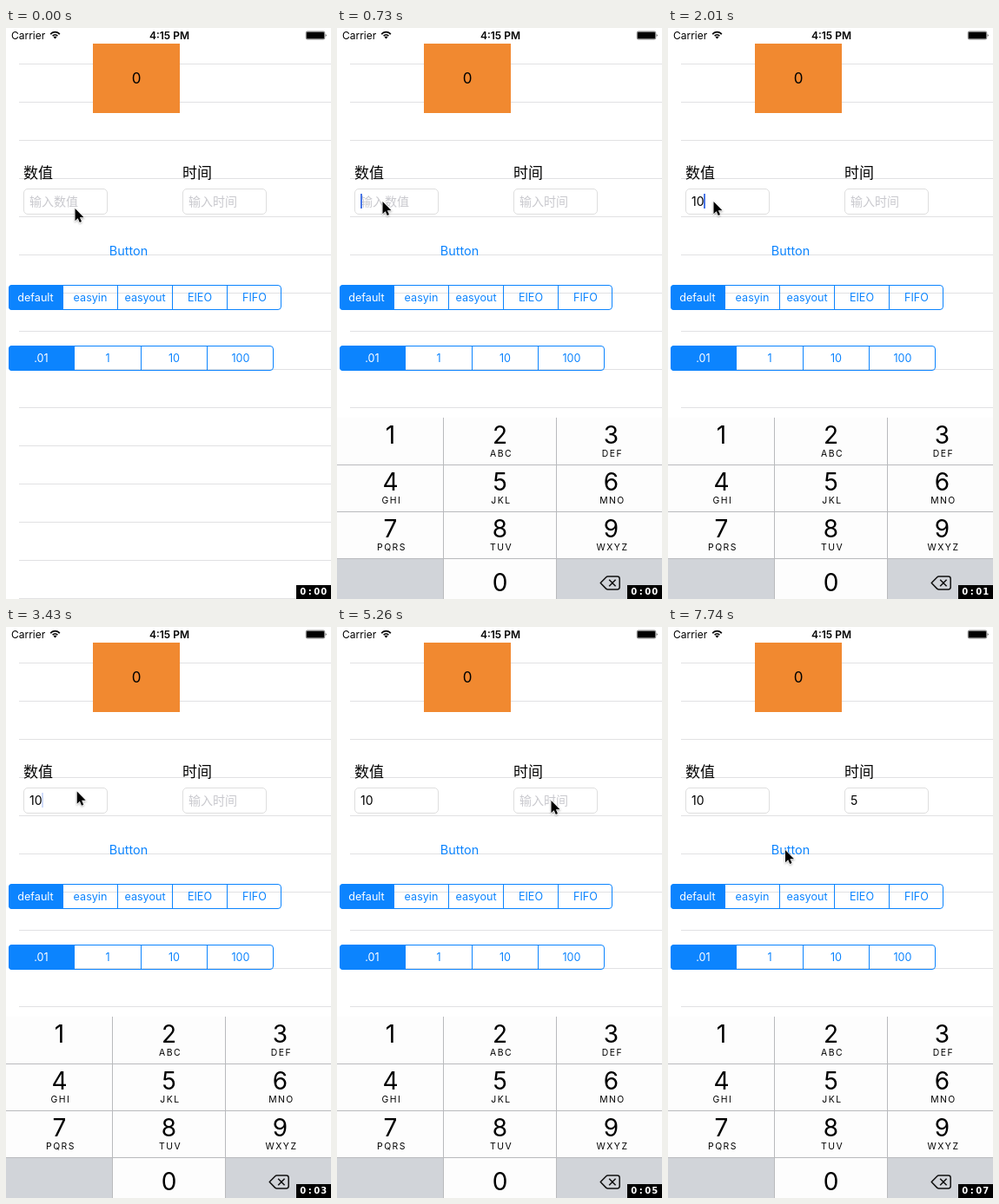
Animation of 374 by 658 pixels, one loop 8 s. Source, as an HTML page:

```html
<!DOCTYPE html>
<html lang="zh-CN">
<head>
<meta charset="utf-8">
<title>Keyboard demo</title>
<style>
  html, body { margin: 0; width: 100%; height: 100%; overflow: hidden; background: #fff; }
  svg { display: block; width: 374px; height: 658px; }
  text { font: 14px Inter, "Noto Sans CJK SC", "Noto Sans CJK", sans-serif; }
  .mid { text-anchor: middle; }
  .label { font-size: 17px; }
  .hint { fill: #c9c9ce; }
  .status { font-size: 12px; }
  .button { font-size: 14.4px; }
  .seg { font-size: 12.6px; }
  .digit { font-size: 28px; }
  .sub { font-size: 10.4px; letter-spacing: 1.5px; }
  .clock { font: bold 10px "DejaVu Sans", sans-serif; }
</style>
</head>
<body>
<svg id="stage" viewBox="0 0 374 658"></svg>
<script>
const LOOP = 8000, FRAME = 1000 / 7, LEAD = 30;
const BLUE = '#0c84fe';
const stage = document.getElementById('stage');

function add(tag, attrs, parent = stage) {
  const el = document.createElementNS('http://www.w3.org/2000/svg', tag);
  for (const key in attrs) el.setAttribute(key, attrs[key]);
  parent.append(el);
  return el;
}
const rect = (x, y, width, height, fill, parent, more) =>
  add('rect', { x, y, width, height, fill, ...more }, parent);
const path = (d, attrs, parent) => add('path', { d, ...attrs }, parent);
function text(str, x, y, cls = '', parent = stage, fill = '') {
  const el = add('text', { x, y, class: cls, ...(fill && { fill }) }, parent);
  el.textContent = str;
  return el;
}

function statusBar() {
  text('Carrier', 6, 12.6, 'status');
  text('4:15 PM', 188, 12.6, 'status mid').style.fontWeight = 600;
  for (const r of [3.4, 6.4]) {
    const dx = r * 0.82, y = 11.3 - r * 0.62;
    path(`M${56.5 - dx} ${y}A${r} ${r} 0 0 1 ${56.5 + dx} ${y}`,
      { fill: 'none', stroke: '#000', 'stroke-width': 1.7 });
  }
  path('M56.5 12.6l-1.9-2.1a2.7 2.7 0 0 1 3.8 0z');
  rect(345.3, 4.1, 21.4, 8.8, 'none', stage, { rx: 1.5, stroke: '#000', 'stroke-width': 0.6 });
  rect(346, 4.8, 20, 7.4, '#000', stage, { rx: 0.8 });
  path('M367.8 6.8q1.6 1.7 0 3.4z');
}

function segments(y, width, names) {
  const left = 3;
  const edge = i => Math.floor(left + i * (width + 1) / names.length);
  path(`M${edge(1)} ${y}H${left + 4}a4 4 0 0 0-4 4v21a4 4 0 0 0 4 4H${edge(1)}z`, { fill: BLUE });
  rect(left + .5, y + .5, width - 1, 28, 'none', stage, { rx: 3.5, stroke: BLUE });
  names.forEach((name, i) => {
    if (i) rect(edge(i) - 1, y, 1, 29, BLUE);
    text(name, (edge(i) + edge(i + 1) - 1) / 2, y + 19, 'seg mid', stage, i ? BLUE : '#fff');
  });
}

function field(x, label) {
  text(label, x, 173, 'label');
  rect(x + .5, 185.5, 96, 29, '#fff', stage, { rx: 4.5, stroke: '#dedede' });
  const hint = text('输入' + label, x + 7, 205, 'hint');
  const value = text('', x + 7, 205);
  return str => {
    value.textContent = str;
    hint.style.opacity = str ? 0 : 1;
  };
}

function keyboard() {
  const pad = add('g');
  const subs = ['', 'ABC', 'DEF', 'GHI', 'JKL', 'MNO', 'PQRS', 'TUV', 'WXYZ'];
  const column = i => 187.5 + (i - 1) * 126 + (i ? 2 : 0) * (i - 1);
  rect(0, 449, 374, 209, '#fdfdfd', pad);
  for (const x of [0, 253]) rect(x, 611, 122, 47, '#d1d4d9', pad);
  for (let y = 503; y < 658; y += 54) rect(0, y, 374, 1, '#b9babd', pad);
  for (const x of [122, 252]) rect(x, 449, 1, 209, '#b9babd', pad);
  subs.forEach((sub, i) => {
    const x = column(i % 3), y = 479 + 54 * Math.floor(i / 3);
    text(i + 1, x, y, 'digit mid', pad);
    text(sub, x + 1.5, y + 15, 'sub mid', pad);
  });
  text('0', column(1), 649, 'digit mid', pad);
  path('M303.2 639.5l6.4-6.6q.9-.9 2.2-.9h10.7q2.7 0 2.7 2.7v9.6q0 2.7-2.7 2.7h-10.7q-1.3 0-2.2-.9z' +
    'M313.2 635.7l7.4 7.6m0-7.6l-7.4 7.6',
    { fill: 'none', stroke: '#111', 'stroke-width': 1.5, 'stroke-linejoin': 'round' }, pad);
  return pad;
}

function pasteMenu() {
  const menu = add('g');
  path('M18 136h54q8 0 8 8v20q0 8-8 8h-35l-9 9-9-9h-1q-8 0-8-8v-20q0-8 8-8z', { fill: '#292929' }, menu);
  text('Paste', 45, 159, 'mid', menu, '#fff').style.fontSize = '13.5px';
  return menu;
}

function clock() {
  rect(334, 642, 40, 16, '#000');
  const chars = [...'0:00'].map((c, i) => text(c, 341.8 + 8 * i, 653.2, 'clock mid', stage, '#fff'));
  return seconds => { chars[3].textContent = seconds; };
}

for (let y = 41; y < 658; y += 44) rect(15, y, 359, 1, '#e1e1e3');
statusBar();
rect(100, 18, 100, 80, '#f18930');
text('0', 150, 64, 'label mid');
const setValue = field(20, '数值');
const setTime = field(203, '时间');
text('Button', 141, 262, 'button mid', stage, BLUE);
segments(296, 314, ['default', 'easyin', 'easyout', 'EIEO', 'FIFO']);
segments(366, 305, ['.01', '1', '10', '100']);
const caret = rect(0, 191, 2, 17, '#4a76e6');
const pad = keyboard();
const menu = pasteMenu();
const setClock = clock();
const cursor = path('M0 0v14.2l3.2-3 2.1 4.9 2.2-1-2.1-4.8h4.6z',
  { stroke: '#fff', 'stroke-width': 1.2, 'paint-order': 'stroke' });
cursor.style.filter = 'drop-shadow(0 1px 1px rgba(0,0,0,.3))';

const clamp = v => Math.min(1, Math.max(0, v));
const ramp = (t, from, to) => clamp((t - from) / (to - from));
const smooth = u => u * u * (3 - 2 * u);

const START = { x: 79.5, y: 208 };
const MOVES = [
  { from: 0, to: 290, x: 52.5, y: 200 },
  { from: 3240, to: 4010, x: 246.5, y: 200, lift: 15 },
  { from: 5290, to: 5700, x: 198, y: 287 },
  { from: 7160, to: 7700, x: 135, y: 257 }
];
function cursorAt(t) {
  let { x, y } = START;
  for (const m of MOVES) {
    const u = ramp(t, m.from, m.to), s = smooth(u);
    x += (m.x - x) * s;
    y += (m.y - y) * s - (m.lift || 0) * Math.sin(Math.PI * u);
  }
  return [x, y];
}

// Each entry moves the caret and restarts its blink.
const CARETS = [
  { at: 740, x: 27 }, { at: 1710, x: 34 }, { at: 1870, x: 41 },
  { at: 4600, x: 210 }, { at: 7000, x: 219 }
];
function drawCaret(t) {
  const { at, x } = CARETS.findLast(c => c.at <= t) || CARETS[0];
  const phase = Math.max(0, t - at) % 1000;
  caret.setAttribute('x', x);
  caret.style.opacity = t < 400 ? 0 : phase > 970 ? 1 : 1 - ramp(phase, 470, 590);
}

function draw(now) {
  // The screen refreshes seven times a second.
  const t = Math.floor((now % LOOP + LEAD) / FRAME) * FRAME;
  const slide = t < 380 ? 209 : Math.round(209 * Math.exp((380 - t) / 50));
  pad.setAttribute('transform', `translate(0 ${slide})`);
  cursor.setAttribute('transform', `translate(${cursorAt(t)})`);
  menu.style.opacity = ramp(t, 900, 1100) - ramp(t, 1640, 1800);
  setValue('10'.slice(0, (t > 1710) + (t > 1850)));
  setTime(t > 6990 ? '5' : '');
  setClock(Math.floor(t / 1030));
  drawCaret(t);
}

function tick() {
  draw(performance.now());
  requestAnimationFrame(tick);
}
tick();
</script>
</body>
</html>
```
